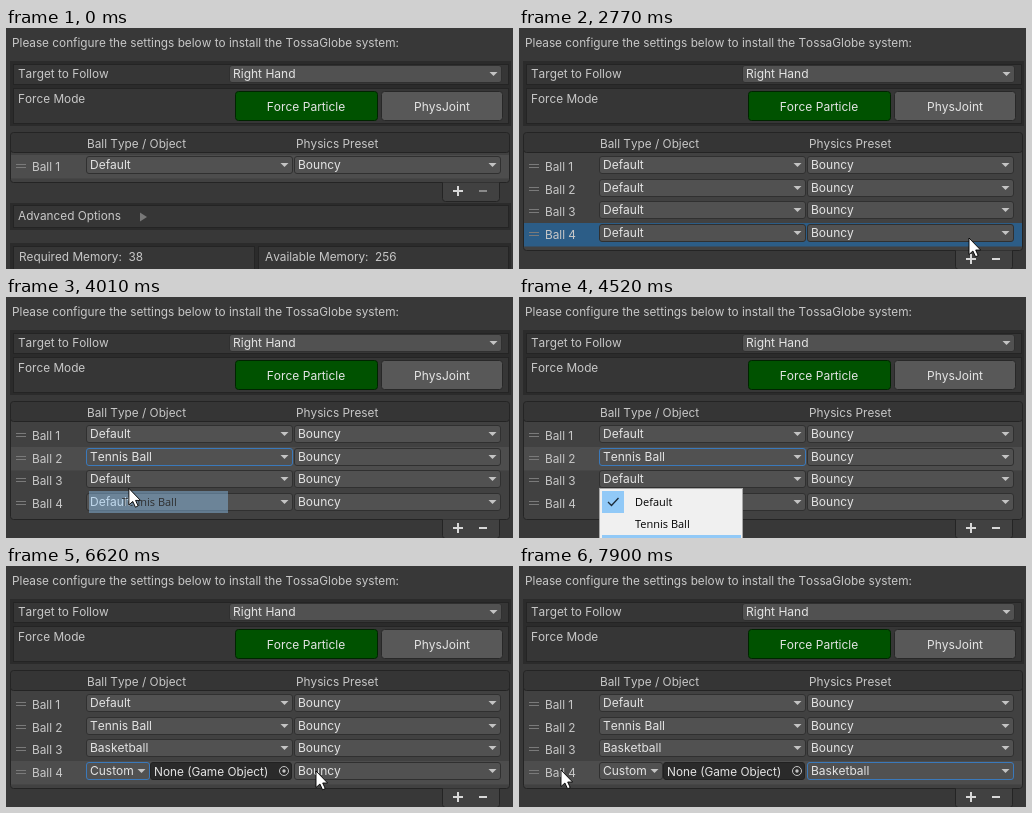
Animation of 507 by 241 pixels, one loop 8 s. Source, as an HTML page:

```html
<!DOCTYPE html>
<html lang="en">
<head>
<meta charset="utf-8">
<title>Ball setup</title>
<style>
  html, body { margin: 0; width: 100%; height: 100%; overflow: hidden; background: #383838; }
  svg { display: block; width: 507px; height: 241px; }
  text { font: 11.8px Inter, sans-serif; font-kerning: none; fill: #c8c8c8; white-space: pre; }
  .value { font-size: 12px; fill: #e4e4e4; }
  .bright { fill: #e4e4e4; }
  .mid { text-anchor: middle; }
  .frame { fill: #2b2b2b; }
  .panel { fill: #363636; stroke: #242424; }
  .field { fill: #515151; stroke: #303030; }
  .on { fill: #005200; stroke: #002400; }
  .off { fill: #585858; stroke: #282828; }
  .object { fill: #2a2a2a; stroke: #212121; }
  .focus { stroke: #3a79bb; }
  .head { fill: #353535; stroke: #242424; }
  .body { fill: #414141; stroke: #242424; }
  .active { fill: #4d4d4d; }
  .selected { fill: #2c5d87; }
  .arrow { fill: #c4c4c4; }
  .grip { stroke: #7a7a7a; }
  .menu { fill: #f0f0f0; stroke: #a8a8a8; }
  .hover { fill: #91c9f7; }
  .item { font: 11px "Open Sans", "Noto Sans", sans-serif; fill: #000; }
  .tick { fill: none; stroke: #1b2b3a; stroke-width: 1.3; }
</style>
</head>
<body>
<svg viewBox="0 0 507 241">
  <text x="6" y="19">Please configure the settings below to install the TossaGlobe system:</text>
  <g id="settings"></g>
  <g id="list"></g>
  <g id="popup"></g>
  <g id="pointer">
    <circle id="click" cx="-.5" r="12" fill="#e8d812" fill-opacity=".66"/>
    <path d="M0 0V16.500L3.900 13L6.600 18.800L9.200 17.500L6.700 12H11.600Z" fill="#fff" stroke="#000" stroke-width=".9"/>
  </g>
</svg>
<script>
const LOOP = 8000, ROW = 22.67, ITEM = 22, CLICK = 105;
const $ = id => document.getElementById(id);

const columns = {
  type: { x: 80, aim: 121, items: ['Default', 'Tennis Ball', 'Basketball'] },
  preset: { x: 288, aim: 310, items: ['Bouncy'] }
};
const adds = [1385, 1890, 2660];
const picks = [
  { col: 'type', row: 1, choice: 1, value: 'Tennis Ball', reach: 3360, open: 3400, close: 3950 },
  { col: 'type', row: 2, choice: 2, value: 'Basketball', reach: 4180, open: 4230, close: 4800 },
  { col: 'type', row: 3, choice: 3, value: 'Custom', reach: 5120, open: 5200, close: 5850 },
  { col: 'preset', row: 3, choice: 2, value: 'Basketball', reach: 6560, open: 6800, close: 7430 }
];

const rowShift = i => Math.round(i * ROW);
const itemY = (row, i) => 149 + rowShift(row) + i * ITEM;
const clamp = v => Math.max(0, Math.min(1, v));
const smooth = k => k * k * (3 - 2 * k);

const clicks = [...adds, ...picks.flatMap(p => [p.open - 45, p.close - 60])];

// The pointer visits each add button, then each field and its menu item.
const moves = adds.map((t, i) => ({ from: t - 470, to: t - 190, x: 443 + 3.5 * i, y: 162 + 24 * i }));
picks.forEach((p, i) => {
  const x = columns[p.col].aim, left = i ? picks[i - 1].close - 60 : 0;
  moves.push(
    { from: Math.max(left, p.reach - 500), to: p.reach, x, y: 137 + rowShift(p.row) },
    { from: p.open, to: p.open + 260, x: x + 3, y: itemY(p.row, p.choice) + 3 });
});
moves.push({ from: 7430, to: 7870, x: 42, y: 204 });

function pointer(t) {
  return moves.reduce(([x, y], m) => {
    const k = smooth(clamp((t - m.from) / (m.to - m.from)));
    return [x + (m.x - x) * k, y + (m.y - y) * k];
  }, [407, 262]);
}

function stateAt(t) {
  const rows = 1 + adds.filter(a => t >= a + 60).length;
  const done = picks.filter(p => t >= p.close);
  const last = done[done.length - 1];
  return {
    rows, last,
    active: last ? last.row : rows - 1,
    added: rows > 1 && !last,
    value: (col, row) =>
      done.find(p => p.col === col && p.row === row)?.value ?? columns[col].items[0]
  };
}

const box = (kind, x, y, w, h, r = 0) =>
  `<rect class="${kind}" x="${x}" y="${y}" width="${w}" height="${h}" rx="${r}"/>`;
const label = (x, y, s, kind = '') => `<text class="${kind}" x="${x}" y="${y}">${s}</text>`;

function dropdown(x, y, w, s, focused) {
  return box('field' + (focused ? ' focus' : ''), x + .5, y + .5, w - 1, 17, 2.5) +
    label(x + 4, y + 13, s, 'value') +
    `<path class="arrow" d="M${x + w - 12.5} ${y + 7}h8l-4 4z"/>`;
}

function objectField(x, y) {
  return box('object', x + .5, y + .5, 141, 17, 2.5) +
    label(x + 4, y + 14, 'None (Game Object)', 'bright') +
    `<g transform="translate(${x + 134} ${y + 9})">
      <circle r="4.500" fill="none" stroke="#c4c4c4"/><circle r="1.700" fill="#c4c4c4"/></g>`;
}

function listRow(i, state) {
  const y = 128 + rowShift(i), type = state.value('type', i), custom = type === 'Custom';
  const focused = col => state.last?.row === i && state.last.col === col;
  return (i === state.active ? box(state.added ? 'selected' : 'active', 5, y - 1, 498, 23.5) : '') +
    `<path class="grip" d="M10 ${y + 8.5}h10m-10 3h10"/>` +
    label(26, y + 15, 'Ball ' + (i + 1)) +
    dropdown(columns.type.x, y, custom ? 64 : 207, type, focused('type')) +
    (custom ? objectField(144, y) : '') +
    dropdown(columns.preset.x, y, 207, state.value('preset', i), focused('preset'));
}

function list(state) {
  const dy = rowShift(state.rows - 1);
  const rows = Array.from({ length: state.rows }, (_, i) => listRow(i, state)).join('');
  return box('body', 4.5, 105.5, 499, 49 + dy, 3) + box('head', 4.5, 104.5, 499, 20, 3) +
    label(81, 120, 'Ball Type / Object') + label(290, 120, 'Physics Preset') + rows +
    `<g transform="translate(0 ${dy})">
    <path class="body" d="M436.500 154.500v16q0 3 3 3h51q3 0 3-3v-16"/>
    <path d="M447 163h10m-5-5v10" stroke="#d8d8d8" stroke-width="2"/>
    <path d="M473 163h8" stroke="${state.rows > 1 ? '#d8d8d8' : '#8a8a8a'}" stroke-width="2"/>` +
    box('frame', 4, 175, 501, 27) + box('panel', 7.5, 177.5, 495, 22) +
    label(12, 192, 'Advanced Options') + '<path d="M134 184.500v9l7-4.500z" fill="#787878"/>' +
    box('frame', 4, 215, 501, 40) + box('panel', 7.5, 218.5, 241, 30) + box('panel', 252.5, 218.5, 250, 30) +
    label(13, 233, 'Required Memory:  38') + label(259, 233, 'Available Memory:  256') + '</g>';
}

function menu(p, t, cursorY) {
  const { x, items } = columns[p.col], top = itemY(p.row, 0);
  const item = (s, i, lit) => {
    const y = itemY(p.row, i);
    return (lit ? box('hover', x + 3, y, 139, ITEM) : '') + label(x + 36, y + 15, s, 'item');
  };
  if (t >= p.close) {
    const fade = 1 - (t - p.close) / 105;
    return fade > 0 && items[p.choice] ? `<g opacity="${fade}">${item(p.value, p.choice, true)}</g>` : '';
  }
  if (t < p.open) return '';
  const over = Math.floor((cursorY - top) / ITEM);
  return `<g opacity="${clamp((t - p.open) / 80)}">` +
    box('menu', x + .5, top - 2.5, 143, 120) + box('hover', x + 3, top, ITEM, ITEM) +
    items.map((s, i) => item(s, i, i === over)).join('') +
    `<path class="tick" d="M${x + 9} ${top + 11}l3.500 3.500l7-7.500"/></g>`;
}

function update(id, markup) {
  const node = $(id);
  if (node.markup !== markup) node.innerHTML = node.markup = markup;
}

$('settings').innerHTML =
  box('frame', 4, 33, 501, 65) + box('panel', 7.5, 36.5, 495, 20) + box('panel', 7.5, 60.5, 495, 35) +
  label(12, 50, 'Target to Follow') + dropdown(223, 37, 273, 'Right Hand') + label(12, 75, 'Force Mode') +
  box('on', 229.5, 63.5, 142, 29, 3) + box('off', 375.5, 63.5, 121, 29, 3) +
  label(300, 83, 'Force Particle', 'value mid') + label(436, 83, 'PhysJoint', 'value mid');

let start;
function render(now) {
  start ??= now;
  const t = (now - start) % LOOP, [x, y] = pointer(t);
  update('list', list(stateAt(t)));
  update('popup', picks.map(p => menu(p, t, y)).join(''));
  $('pointer').setAttribute('transform', `translate(${x} ${y})`);
  $('click').setAttribute('visibility', clicks.some(c => t >= c && t < c + CLICK) ? 'visible' : 'hidden');
  requestAnimationFrame(render);
}
requestAnimationFrame(render);
</script>
</body>
</html>
```
